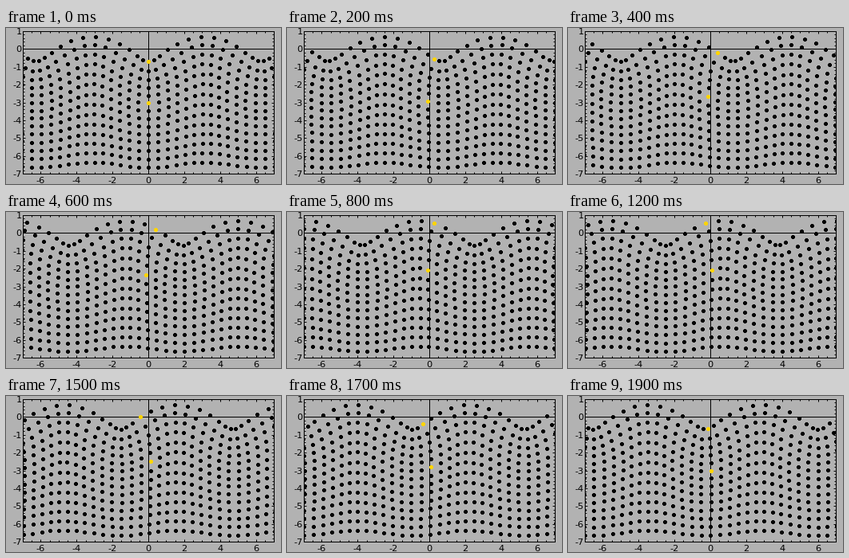
These frames come from a looping animation (344 by 196 pixels, 2000 ms). A matplotlib script:

```python
import numpy as np
import matplotlib.pyplot as plt
from matplotlib.animation import FuncAnimation
from matplotlib.path import Path
from matplotlib.ticker import MultipleLocator

W, H, DPI = 344, 196, 100
FRAMES, INTERVAL = 20, 100
PX = 72 / DPI
LEFT, RIGHT, TOP, BOTTOM = 21, 335, 4, 183
GRAY, GOLD = "#b2b2b2", "#ffd400"

# Rayleigh wave in a solid whose P speed is twice its S speed
C2 = 0.8696
Q = np.sqrt(1 - C2 / 4)
S = np.sqrt(1 - C2)


def amplitudes(y):
    """Horizontal and vertical displacement at height y <= 0."""
    p, s = np.exp(Q * y), np.exp(S * y)
    horizontal = p - (1 + S**2) / 2 * s
    vertical = Q * (2 / (1 + S**2) * s - p)
    return horizontal, vertical


def displaced(x, y, t):
    u, w = amplitudes(y)
    return x + u * np.sin(t - x), y - w * np.cos(t - x)


gx, gy = np.meshgrid(np.arange(-7, 7.1, 0.5), np.arange(0, -6.6, -0.5))
marked = (gx == 0) & ((gy == 0) | (gy == -2.5))

fig = plt.figure(figsize=(W / DPI, H / DPI), dpi=DPI, facecolor=GRAY)
ax = fig.add_axes(
    [LEFT / W, 1 - BOTTOM / H, (RIGHT - LEFT) / W, (BOTTOM - TOP) / H],
    facecolor=GRAY,
)
ax.set(xlim=(-7, 7), ylim=(-7, 1))
ax.xaxis.set_major_locator(MultipleLocator(2))
ax.xaxis.set_minor_locator(MultipleLocator(0.5))
ax.yaxis.set_major_locator(MultipleLocator(1))
ax.yaxis.set_minor_locator(MultipleLocator(0.2))
ax.tick_params(which="both", direction="in", top=True, right=True,
               labelbottom=False, labelleft=False, width=PX)
ax.tick_params(which="major", length=3 * PX)
ax.tick_params(which="minor", length=2 * PX)
for spine in ax.spines.values():
    spine.set_linewidth(PX)
ax.axhline(0, color="black", lw=PX, zorder=1)
ax.axvline(0, color="black", lw=PX, zorder=1)


def label(x, baseline, value, ha):
    fig.text(x / W, 1 - baseline / H, str(value), ha=ha, va="baseline",
             family="DejaVu Sans", size=11.4 * PX)


for v in range(-6, 7, 2):
    label((LEFT + RIGHT) / 2 + v * (RIGHT - LEFT) / 14, 195, v, "center")
for v in range(-7, 2):
    label(19.5, TOP + (1 - v) * (BOTTOM - TOP) / 8 + 4, v, "right")

# A crisp dot: five pixels square without its corners, on a pixel centre
disc = Path([(-1, -3), (2, -3), (2, -2), (3, -2), (3, 1), (2, 1), (2, 2),
             (-1, 2), (-1, 1), (-2, 1), (-2, -2), (-1, -2), (-1, -3)],
            closed=True)
dot = dict(ls="", marker=disc, ms=6 * PX, mew=0)
black, = ax.plot([], [], color="black", zorder=2, **dot)
gold, = ax.plot([], [], color=GOLD, zorder=2.1, **dot)


def update(i):
    x, y = displaced(gx, gy, 2 * np.pi * i / FRAMES)
    black.set_data(x[~marked], y[~marked])
    gold.set_data(x[marked], y[marked])
    return black, gold


anim = FuncAnimation(fig, update, frames=FRAMES, interval=INTERVAL,
                     repeat=True, repeat_delay=0)
plt.show()
```
